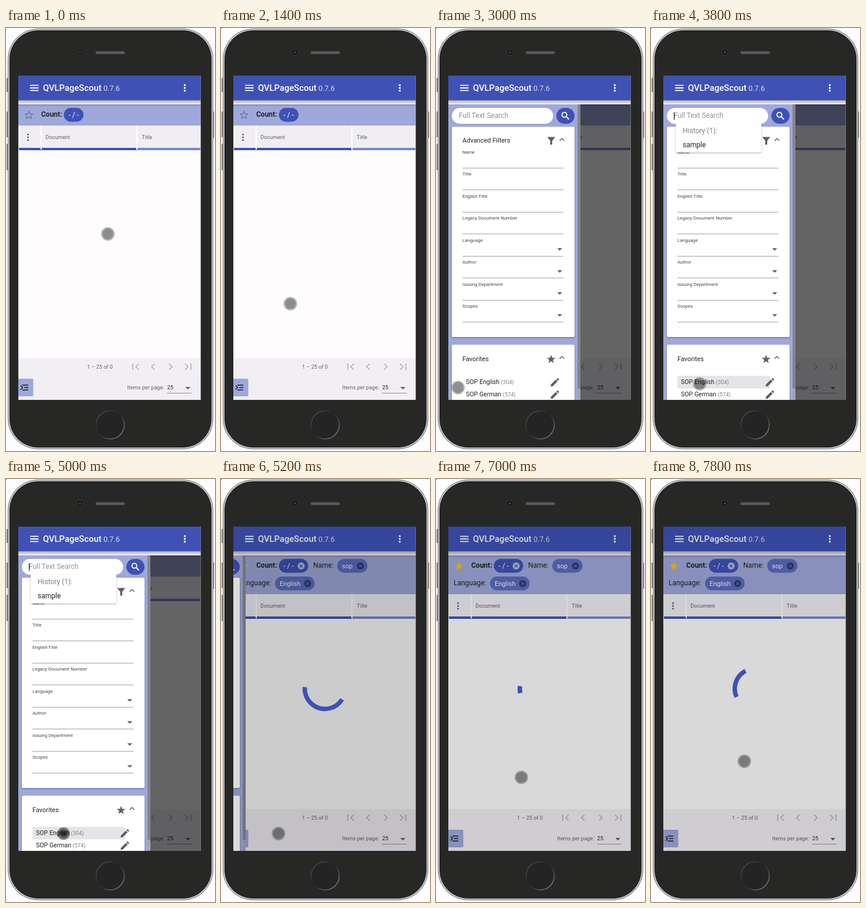
Animation, 356 px wide and 720 px high, one loop 8000 ms. Source, as an HTML page:

```html
<!DOCTYPE html>
<html lang="en">
<head>
<meta charset="utf-8">
<title>Document search on a phone</title>
<style>
  html, body { margin: 0; width: 100%; height: 100%; overflow: hidden; background: #fefcfe; }
  svg { display: block; width: 356px; height: 720px; }
  text { font-family: Roboto, Arial, sans-serif; white-space: pre; fill: #222; }
  .s8 { font-size: 7.9px; fill: #444; }
  .s9 { font-size: 9px; fill: #626065; letter-spacing: .05px; }
  .s10 { font-size: 10.6px; }
  .s11 { font-size: 11px; }
  .s12 { font-size: 12px; }
  .w { fill: #fff; }
  .dim { fill: #808084; }
  .ico { fill: #5f5f61; }
  .line { fill: none; stroke: #5f5f61; stroke-width: 1.5; }
  .nav { fill: none; stroke: #aeacb0; stroke-width: 1.6; }
</style>
</head>
<body>
<svg viewBox="0 0 356 720">
  <defs>
    <clipPath id="screen"><rect x="21" y="81" width="311" height="552"/></clipPath>
    <linearGradient id="drop" x2="0" y2="1">
      <stop stop-color="#aeacb4"/><stop offset="1" stop-color="#f6f4f8"/>
    </linearGradient>
    <linearGradient id="rim" x2="0" y2="1">
      <stop stop-color="#000" stop-opacity=".16"/><stop offset="1" stop-color="#000" stop-opacity="0"/>
    </linearGradient>
    <linearGradient id="home" x2="1" y2="1">
      <stop stop-color="#5c5c5c"/><stop offset=".45" stop-color="#222"/><stop offset="1" stop-color="#909090"/>
    </linearGradient>
    <radialGradient id="press">
      <stop stop-opacity=".8"/><stop offset=".5" stop-opacity=".68"/><stop offset="1" stop-opacity=".32"/>
    </radialGradient>
    <filter id="shadow" x="-10%" y="-10%" width="120%" height="130%">
      <feDropShadow dx="0" dy="1.2" stdDeviation="1.2" flood-opacity=".35"/>
    </filter>
  </defs>

  <!-- phone -->
  <g fill="#85838a">
    <rect x="1" y="85" width="4" height="24" rx="1"/>
    <rect x="1" y="142" width="4" height="44" rx="1"/>
    <rect x="1" y="197" width="4" height="45" rx="1"/>
    <rect x="351" y="142" width="3.5" height="45" rx="1"/>
  </g>
  <rect x="3.5" y="1.5" width="349" height="715" rx="51" fill="#c3c1c6" stroke="#77757a"/>
  <rect x="6.5" y="4.5" width="343" height="709" rx="48" fill="#272726" stroke="#1a1a1a"/>
  <circle cx="126" cy="41.5" r="4.8" fill="#151515" stroke="#3a3a3a"/>
  <circle cx="126" cy="41.5" r="1.8" fill="#3a4a66"/>
  <rect x="152.500" y="39.500" width="50" height="5" rx="2.500" fill="#5a5a5a" stroke="#3c3c3c"/>
  <circle cx="177.500" cy="675.500" r="24" fill="#242424" stroke="url(#home)" stroke-width="1.6"/>

  <g clip-path="url(#screen)">
    <rect x="21" y="81" width="311" height="552" fill="#fefcfd"/>

    <!-- filter bar -->
    <rect id="bar" x="21" y="130" width="311" height="36" fill="#9fa8da"/>
    <rect x="21" y="130" width="311" height="4" fill="url(#rim)"/>
    <path id="fav"/>
    <text x="60" y="151" class="s12" font-weight="700">Count:</text>
    <g id="chips"></g>

    <!-- table head -->
    <g id="head">
      <rect x="21" y="166" width="311" height="38" fill="#f0eef3"/>
      <rect x="22" y="204" width="201" height="4" fill="#3f51b5"/>
      <rect x="224" y="204" width="107" height="4" fill="#7986cb"/>
      <path d="M60 166v41M223 166v41" stroke="#fff" stroke-width="2"/>
      <g class="ico"><circle cx="37.500" cy="181.300" r="1.5"/><circle cx="37.500" cy="186" r="1.5"/><circle cx="37.500" cy="190.700" r="1.5"/></g>
      <text x="67.300" y="189" class="s9">Document</text>
      <text x="231.300" y="189" class="s9">Title</text>
    </g>

    <!-- paginator -->
    <rect x="21" y="562" width="311" height="71" fill="#f1eff3"/>
    <text x="138" y="580" class="s9">1 – 25 of 0</text>
    <path class="nav" d="M216 571v11M226 571.500l-5 5 5 5M253 571.500l-5 5 5 5M278 571.500l5 5-5 5M305 571.500l5 5-5 5M315 571v11"/>
    <text x="206.500" y="615" class="s9">Items per page:</text>
    <text x="274.500" y="615" style="font-size:9.400px">25</text>
    <path class="ico" d="M305.500 611h8.500l-4.250 4.200z"/>
    <path d="M274 621.500h42" stroke="#929094"/>

    <!-- drawer toggle -->
    <rect x="18" y="597" width="28.500" height="30" rx="2" fill="#9fa8da"/>
    <rect id="ripple" x="18" y="597" width="28.500" height="30" rx="2" opacity=".1"/>
    <path d="M25 608.500l3.300 3.500-3.300 3.500M28 607.800h10M31 612h7M28 616.200h10" fill="none" stroke="#1c1c22" stroke-width="1.6"/>

    <rect id="backdrop" x="21" y="130" width="311" height="503"/>

    <g id="drawer">
      <rect x="20" y="130" width="226" height="503" fill="#9fa8da"/>
      <rect x="241" y="130" width="5" height="503" fill="#a5a4b4"/>
      <rect x="241" y="130" width="5" height="484" fill="#87858b"/>
      <rect x="27" y="136" width="172.500" height="27" rx="13.500" fill="#fff"/>
      <text x="39" y="153" class="s12" style="fill:#929296">Full Text Search</text>
      <rect x="205" y="136" width="31" height="27" rx="13.500" fill="#3f51b5"/>
      <g fill="none" stroke="#fff" stroke-width="1.9"><circle cx="218.700" cy="147.700" r="4.100"/><path d="M221.500 150.500l5 5"/></g>
      <g fill="#fff" filter="url(#shadow)">
        <rect x="27" y="168" width="209" height="358" rx="2.500"/>
        <rect x="27" y="539" width="209" height="120" rx="2.500"/>
      </g>
      <text x="45" y="195" class="s11">Advanced Filters</text>
      <path class="ico" d="M189.500 185.500h13.500l-5 6.500v6.500h-3.500v-6.500z"/>
      <path class="line" d="M210.500 192l4-4 4 4M210.500 563l4-4 4 4"/>
      <g id="fields"></g>
      <text x="45" y="567" class="s11">Favorites</text>
      <path id="favs" class="ico"/>
      <rect id="hover" x="45" y="592" width="158" height="21.500" fill="#e7e4e9"/>
      <g id="items"></g>
    </g>

    <g id="popup">
      <rect x="42" y="163" width="146" height="48.500" fill="#fff" filter="url(#shadow)"/>
      <text x="54" y="179" class="s12 dim">History (1):</text>
      <text x="54" y="203" class="s12">sample</text>
      <path d="M39.500 143.500v13" stroke="#111"/>
    </g>

    <!-- toolbar -->
    <rect x="21" y="123" width="311" height="7" fill="url(#drop)"/>
    <rect x="21" y="81" width="311" height="42" fill="#3f51b5"/>
    <path d="M41 97.700h14.500M41 102h14.500M41 106.300h14.500" stroke="#fff" stroke-width="1.8"/>
    <text x="63" y="107" class="w" style="font-size:14.800px" font-weight="500">QVLPageScout</text>
    <text x="166" y="107" class="w" style="font-size:12.500px" opacity=".8">0.7.6</text>
    <g class="w"><circle cx="304.500" cy="97.300" r="1.700"/><circle cx="304.500" cy="102" r="1.700"/><circle cx="304.500" cy="106.700" r="1.700"/></g>

    <g id="busy">
      <rect x="21" y="81" width="311" height="552" opacity=".14"/>
      <circle id="arc" cx="177" cy="357" r="34.300" fill="none" stroke="#3f51b5" stroke-width="7.600" pathLength="360"/>
    </g>
    <path d="M331.500 81v552" stroke="#8a888c" opacity=".6"/>
  </g>

  <g id="cursor">
    <g id="up"><circle r="10.300" fill="none" stroke="#000" stroke-width="2.400" opacity=".28"/><circle r="9.200" opacity=".44"/></g>
    <circle id="down" r="11" fill="url(#press)"/>
  </g>
  <rect id="dot" width="1" height="1"/>
</svg>

<script>
const LOOP = 8000, STEP = 200, DRAWER = 226;
const OPEN = 2620, CLOSE = 5028, SLIDE = 400, LOAD = 5200;
const $ = id => document.getElementById(id);
const show = (id, on) => $(id).setAttribute('visibility', on ? 'visible' : 'hidden');

function star(cx, cy, r) {
  const pts = Array.from({ length: 10 }, (_, i) => {
    const a = i * Math.PI / 5 - Math.PI / 2, d = i % 2 ? r * 0.41 : r;
    return (cx + d * Math.cos(a)).toFixed(2) + ' ' + (cy + d * Math.sin(a)).toFixed(2);
  });
  return 'M' + pts.join('L') + 'z';
}

function chip(x, y, w, label, fill, size, cancel) {
  const cx = x + w - 12, cy = y + 12;
  const close = cancel ? `<circle cx="${cx}" cy="${cy}" r="6" fill="${cancel}"/>
    <path d="M${cx - 2.3} ${cy - 2.3}l4.600 4.600m0-4.600l-4.600 4.600" stroke="${fill}" stroke-width="1.300"/>` : '';
  return `<rect x="${x}" y="${y}" width="${w}" height="23.500" rx="11.700" fill="${fill}"/>
    <text x="${x + 8}" y="${y + 16}" class="w ${size}">${label}</text>` + close;
}

const idleChips = chip(98.500, 136, 33.500, '- / -', '#3f51b5', 's12');
const filterChips = chip(98.500, 136, 50, '- / -', '#3f51b5', 's12', '#b4b8dc')
  + chip(198, 136, 51.500, 'sop', '#5c6bc0', 's11', '#323a6c')
  + chip(92, 166, 67.500, 'English', '#5c6bc0', 's11', '#323a6c')
  + '<text x="157" y="151" class="s12">Name:</text><text x="30" y="181" class="s12">Language:</text>';

$('fields').innerHTML = ['Name', 'Title', 'English Title', 'Legacy Document Number',
  'Language', 'Author', 'Issuing Department', 'Scopes'].map((name, i) => {
  const y = 214 + i * 37.45;
  const arrow = i > 3 ? `<path class="ico" d="M206.500 ${y + 11}h8.500l-4.250 4.200z"/>` : '';
  return `<text x="45" y="${y}" class="s8">${name}</text>
    <path d="M45 ${Math.round(y + 24) + 0.5}h172" stroke="#a3a1a5"/>` + arrow;
}).join('');

$('items').innerHTML = [['SOP English', 304, 110.500], ['SOP German', 574, 113.500]].map(([name, n, x], i) => {
  const y = 606 + i * 21;
  return `<text x="51" y="${y}" class="s10">${name}</text>
    <text x="${x}" y="${y}" class="dim" style="font-size:9.300px">(${n})</text>
    <path class="ico" transform="translate(195.500 ${y - 10})" d="M0 14v-3l8.600-8.600 3 3L3 14zM9.500 1.500L11 0h1l2 2v1l-1.500 1.500z"/>`;
}).join('');
$('favs').setAttribute('d', star(196, 564, 7.8));

// cubic-bezier easing, solved by bisection
function ease(x, x1, y1, x2, y2) {
  if (x <= 0) return 0;
  if (x >= 1) return 1;
  const at = (s, a, b) => 3 * (1 - s) * (1 - s) * s * a + 3 * (1 - s) * s * s * b + s * s * s;
  let lo = 0, hi = 1;
  for (let i = 0; i < 30; i++) {
    const mid = (lo + hi) / 2;
    if (at(mid, x1, x2) < x) lo = mid; else hi = mid;
  }
  return at(lo, y1, y2);
}

// rows of [time, ...values], linear between rows
function track(rows, t) {
  const i = rows.findIndex(r => r[0] > t);
  if (i === 0) return rows[0].slice(1);
  if (i < 0) return rows[rows.length - 1].slice(1);
  const a = rows[i - 1], b = rows[i], k = (t - a[0]) / (b[0] - a[0]);
  return a.slice(1).map((v, j) => v + (b[j + 1] - v) * k);
}

const path = [[600, 173.500, 350.500], [1800, 90.500, 528.500], [2400, 37.500, 612],
  [3200, 37.500, 612], [4000, 98, 603.500], [6300, 98, 603.500], [7200, 159, 480.500]];
const spin = [[5200, 1.175], [6200, 2.14], [7800, 3.745]];

// indeterminate spinner: the head runs ahead for half a second, then the tail catches up
function drawArc(u) {
  const turn = Math.floor(u), part = (u - turn) * 2;
  const e = 270 * ease(part % 1, 0.35, 0, 0.25, 1);
  const base = 180 * u - 90 + 270 * turn;
  const tail = part < 1 ? base : base + e;
  const len = part < 1 ? 18 + e : 288 - e;
  $('arc').setAttribute('transform', `rotate(${tail % 360} 177 357)`);
  $('arc').setAttribute('stroke-dasharray', `${len} 360`);
}

let loaded = null;
function setLoaded(on) {
  if (on === loaded) return;
  loaded = on;
  $('chips').innerHTML = on ? filterChips : idleChips;
  $('bar').setAttribute('height', on ? 66 : 36);
  $('head').setAttribute('transform', `translate(0 ${on ? 30 : 0})`);
  const fav = $('fav');
  fav.setAttribute('d', star(39, 148.500, on ? 8 : 7.2));
  fav.setAttribute('fill', on ? '#ffc107' : 'none');
  fav.setAttribute('stroke', on ? 'none' : '#5b6296');
  show('busy', on);
}

function draw(t) {
  const slide = s => ease((t - s) / SLIDE, 0.25, 0.8, 0.25, 1);
  const open = slide(OPEN) - slide(CLOSE);
  $('drawer').setAttribute('transform', `translate(${Math.round((open - 1) * DRAWER)} 0)`);
  $('backdrop').setAttribute('opacity', 0.6 * open);
  show('drawer', open > 0);
  show('popup', t >= 3400 && t < LOAD);

  setLoaded(t >= LOAD);
  if (loaded) drawArc(track(spin, t)[0]);

  const [x, y] = track(path, t);
  const pressed = t === 2600 || t === 5000;
  $('cursor').setAttribute('transform', `translate(${x} ${y})`);
  show('up', !pressed);
  show('down', pressed);
  show('ripple', t === 2600);
  show('hover', t > 3200 && t < LOAD && x > 45);
  show('dot', t >= 200);
}

const start = performance.now();
function tick() {
  const t = (performance.now() - start) % LOOP;
  draw(Math.floor(t / STEP) * STEP);
  requestAnimationFrame(tick);
}
tick();
</script>
</body>
</html>
```
